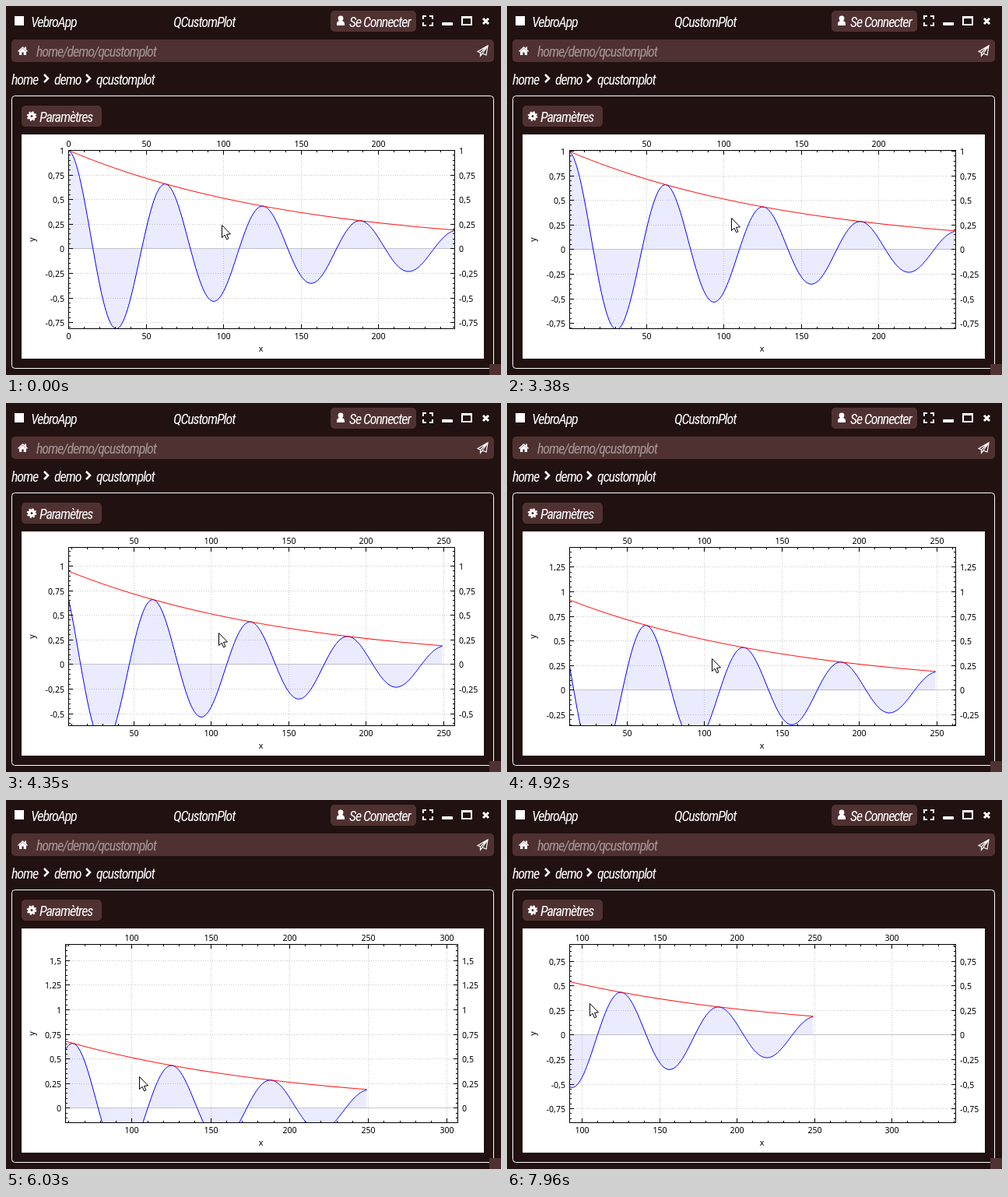
An HTML page with a canvas that plays this animation: 636x474 px, repeating every 8000 ms.

```html
<!DOCTYPE html>
<html lang="fr">
<head>
<meta charset="utf-8">
<title>QCustomPlot</title>
<style>
html, body { margin: 0; width: 100%; height: 100%; overflow: hidden; background: #211111; }
svg, canvas { position: absolute; left: 0; top: 0; }
canvas { left: 20px; top: 165px; }
text { font: italic 18px "Roboto Condensed", "Open Sans Condensed", Roboto, sans-serif; font-stretch: 75%; letter-spacing: -1.1px; fill: #fff; }
.box { fill: #503132; }
.line { fill: none; stroke: #fff; stroke-width: 2; }
.icon { fill: #fff; }
</style>
</head>
<body>
<svg width="636" height="474">
  <rect class="icon" x="11" y="13" width="12" height="12"/>
  <text x="32" y="27">VebroApp</text>
  <text x="215" y="27">QCustomPlot</text>

  <rect class="box" x="417" y="6" width="110" height="27" rx="5"/>
  <path class="icon" d="M425 25v-2q0-3 3-4h4q3 1 3 4v2z"/>
  <circle class="icon" cx="430" cy="16" r="3.4"/>
  <text x="441" y="27">Se Connecter</text>
  <path class="line" d="M536 17v-4h4M544 13h4v4M548 21v4h-4M540 25h-4v-4"/>
  <rect class="icon" x="560" y="21" width="14" height="4" rx="1"/>
  <path class="line" d="M586 14h12v10h-12zM586 15h12"/>
  <path class="line" style="stroke-width:3" d="M613 16l7 7m0-7l-7 7"/>

  <rect class="box" x="7" y="43" width="620" height="29" rx="5"/>
  <path class="icon" d="M15 58l6.500-6 2.500 2.300v-1.800h2v3.600l2 1.900-1 1-5.500-5-5.500 5zM17 58.500l4.500-4 4.500 4v4.500h-3.300v-3.500h-2.400v3.500h-3.300z"/>
  <text x="39" y="65" style="fill:#a59895">home/demo/qcustomplot</text>
  <path class="line" style="stroke-width:1.200" d="M606 58.500L619 51l-2 12-5-2-2.500 3v-4zM609.500 60L619 51l-7 10"/>

  <text x="7" y="101">home</text>
  <text x="62" y="101">demo</text>
  <text x="116" y="101">qcustomplot</text>
  <path class="line" style="stroke-width:2.600" d="M49 88l5 5-5 5M103 88l5 5-5 5"/>

  <rect class="line" style="stroke-width:1" x="7.500" y="115.500" width="619" height="350" rx="4"/>
  <rect class="box" x="20" y="128" width="103" height="27" rx="5"/>
  <circle cx="33" cy="141.500" r="3.200" fill="none" stroke="#fff" stroke-width="3.400"/>
  <circle cx="33" cy="141.500" r="5.300" fill="none" stroke="#fff" stroke-width="2" stroke-dasharray="2.080"/>
  <text x="43" y="149">Paramètres</text>
  <rect class="box" x="621" y="460" width="15" height="14"/>
</svg>
<canvas width="594" height="288"></canvas>
<script>
const ctx = document.querySelector('canvas').getContext('2d');
const LOOP = 8000, TOP = 185, BOTTOM = 414, SPAN_X = 249;
const UNIT_Y = (BOTTOM - TOP) / 1.8126;
const DRAG_START = 3380, DRAG_STEP = 138.5, HOVER_STEP = 130, HOVER_STEPS = 8;
const GRAB_X = 104.9, GRAB_Y = 271;

// Key points of the drag: step, left end of the x axis, vertical shift in pixels
const dragKeys = [[0, .5, 1], [7, 8, 24], [11, 13.05, 57], [12, 13.3, 66], [14, 13.3, 70],
  [19, 57.8, 84], [21, 89.5, 71], [27, 89.5, 71], [33, 92, -10]];

const decay = x => Math.exp(-x / 150);
const wave = x => decay(x) * Math.cos(x / 10);
const mix = (a, b, p) => a + (b - a) * p;
const crisp = v => Math.round(v) + .5;

function dragAt(step) {
  const next = dragKeys.findIndex(key => key[0] > step);
  if (next < 0) return dragKeys.at(-1).slice(1);
  const [s0, x0, y0] = dragKeys[next - 1], [s1, x1, y1] = dragKeys[next];
  const p = (step - s0) / (s1 - s0);
  return [mix(x0, x1, p), mix(y0, y1, p)];
}

function line(x1, y1, x2, y2) {
  ctx.beginPath();
  ctx.moveTo(x1, y1);
  ctx.lineTo(x2, y2);
  ctx.stroke();
}

function label(text, x, y, align = 'center') {
  ctx.textAlign = align;
  ctx.fillText(text, x, y + 4);
}

// Multiples of step within [min, max]; every fifth is major
function ticks(min, max, step) {
  const list = [];
  for (let i = Math.ceil(min / step - 1e-9); i * step <= max + 1e-9; i++)
    list.push({ value: i * step, index: i, major: i % 5 === 0, size: i % 5 ? 3 : 6 });
  return list;
}

function drawPointer(x, y) {
  ctx.beginPath();
  [[0, 0], [0, 16], [3.6, 12.7], [6, 18.3], [8.4, 17.3], [6, 11.8], [11, 11.4]]
    .forEach(([px, py]) => ctx.lineTo(x + .5 + px, y + .5 + py));
  ctx.closePath();
  ctx.fillStyle = '#fff';
  ctx.fill();
  ctx.strokeStyle = '#000';
  ctx.stroke();
}

function draw(t) {
  const dragging = t >= DRAG_START;
  const [xMin, shift] = dragging ? dragAt(Math.floor((t - DRAG_START) / DRAG_STEP)) : [0, 0];
  const yMax = 1 + shift / UNIT_Y, yMin = yMax - (BOTTOM - TOP) / UNIT_Y;
  // Margins shrink when no negative label is in view
  const inset = yMin > -.25 ? 4 : 0;
  const left = 80 - inset, right = 576 + inset, unitX = (right - left) / SPAN_X;
  const X = x => left + (x - xMin) * unitX;
  const Y = y => TOP + (yMax - y) * UNIT_Y;
  const xTicks = ticks(xMin, xMin + SPAN_X, 10), yTicks = ticks(yMin, yMax, .05);

  ctx.setTransform(1, 0, 0, 1, -20, -165);
  ctx.fillStyle = '#fff';
  ctx.fillRect(20, 165, 594, 288);
  ctx.lineWidth = 1;

  ctx.strokeStyle = '#c8c8c8';
  const gridLine = (tick, ...ends) => {
    if (!tick.major) return;
    ctx.setLineDash(tick.index ? [1, 2] : []);
    line(...ends);
  };
  for (const tick of xTicks) {
    const x = crisp(X(tick.value));
    gridLine(tick, x, BOTTOM + 1, x, TOP);
  }
  for (const tick of yTicks) {
    const y = crisp(Y(tick.value));
    gridLine(tick, left, y, right, y);
  }
  ctx.setLineDash([]);

  ctx.save();
  ctx.beginPath();
  ctx.rect(left, TOP, right - left + 1, BOTTOM - TOP + 1);
  ctx.clip();
  const curve = f => {
    const path = new Path2D();
    for (let x = 0; x < 250; x++) path.lineTo(X(x) + .5, Y(f(x)) + .5);
    return path;
  };
  const blue = curve(wave), area = new Path2D(blue);
  area.lineTo(X(249) + .5, Y(0) + .5);
  area.lineTo(X(0) + .5, Y(0) + .5);
  ctx.fillStyle = 'rgba(0,0,255,.08)';
  ctx.fill(area);
  ctx.strokeStyle = '#00f';
  ctx.stroke(blue);
  ctx.strokeStyle = '#f00';
  ctx.stroke(curve(decay));
  ctx.restore();

  ctx.strokeStyle = ctx.fillStyle = '#000';
  ctx.strokeRect(left + .5, TOP + .5, right - left, BOTTOM - TOP);
  ctx.font = '10.6px "Noto Sans", sans-serif';
  for (const { value, major, size } of xTicks) {
    const x = crisp(X(value));
    line(x, TOP, x, TOP + size);
    line(x, BOTTOM + 1, x, BOTTOM + 1 - size);
    if (major) [177, 424].forEach(y => label(value, x, y));
  }
  for (const { index, major, size, value } of yTicks) {
    const y = crisp(Y(value));
    line(left, y, left + size, y);
    line(right + 1, y, right + 1 - size, y);
    if (major) {
      const text = String(index / 20).replace('.', ',');
      label(text, left - 5, y, 'right');
      label(text, right + 6, y, 'left');
    }
  }
  label('x', 327.5, 440);
  ctx.save();
  ctx.translate(34, 300);
  ctx.rotate(-Math.PI / 2);
  label('y', 0, -1);
  ctx.restore();

  if (dragging) {
    drawPointer(Math.round(X(GRAB_X)), Math.round(GRAB_Y + shift));
  } else {
    const p = Math.min(Math.floor(t / HOVER_STEP) / HOVER_STEPS, 1);
    drawPointer(Math.round(mix(277, 289, p)), Math.round(mix(281, 270, p)));
  }
}

function frame() {
  draw(performance.now() % LOOP);
  requestAnimationFrame(frame);
}
frame();
</script>
</body>
</html>
```
